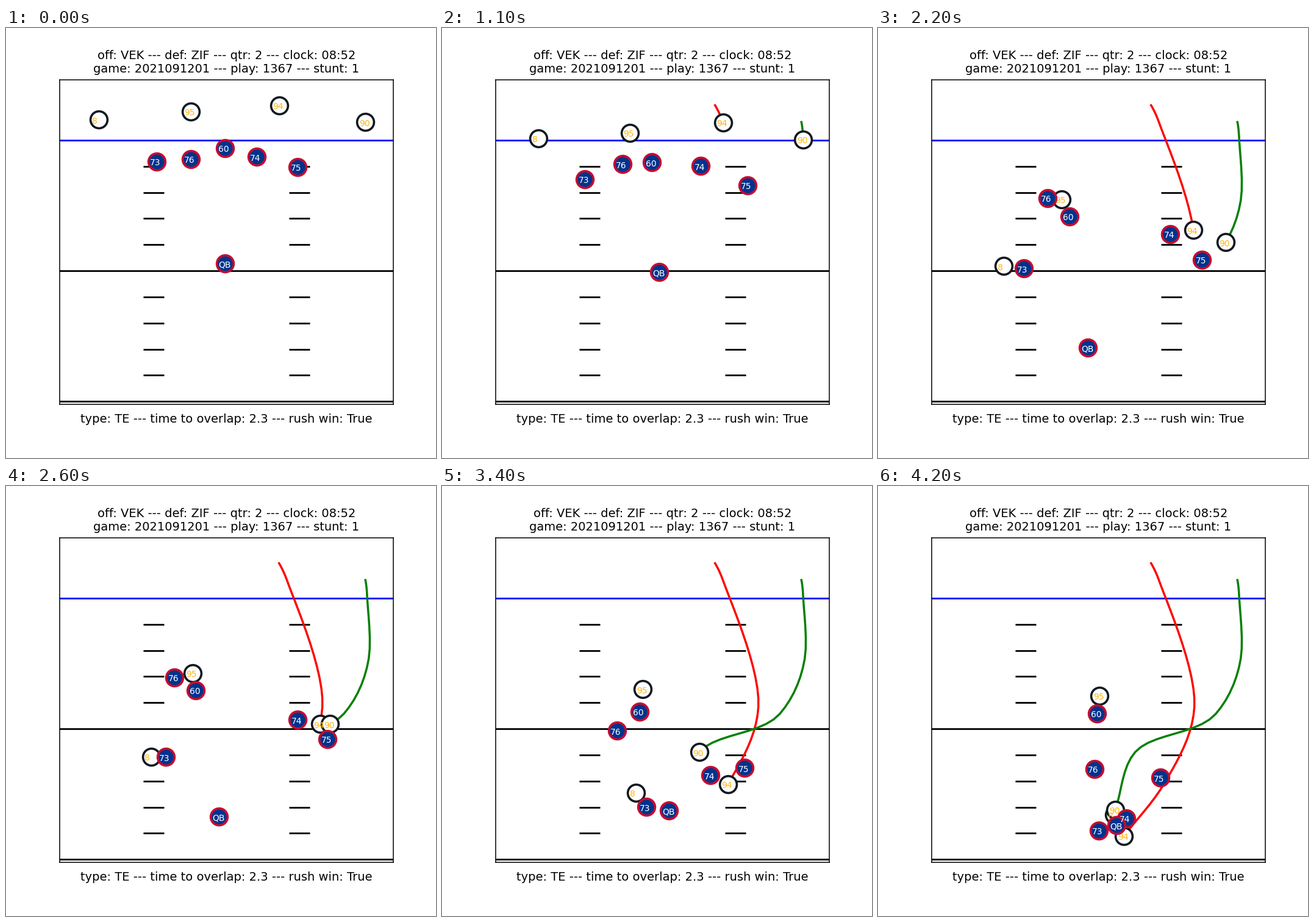
A matplotlib script for the animation above (4300 ms loop, 705 px wide and 705 px high).

```python
import numpy as np
import matplotlib.pyplot as plt
from matplotlib.animation import FuncAnimation

SIZE, DPI = 705, 100
FRAMES, STEP_MS = 43, 100
SNAP = 5  # players hold still until the snap
KEYS = (SNAP, 11, 24, 34, 42)

NAVY, RED, INK, GOLD = "#00338D", "#C60C30", "#101820", "#FFB612"
NUDGE = 0.3  # sub-pixel offset of the player markers
LABEL_SHIFT = np.array([-10.5, 6.6])


def route(*points, keys=KEYS):
    """Smooth run through the points, at rest until the first key."""
    t, p = np.array(keys, float), np.array(points) - NUDGE
    h = np.diff(t)[:, None]
    slope = np.diff(p, axis=0) / h
    m = np.zeros_like(p)
    m[1:-1] = (slope[:-1] * h[1:] + slope[1:] * h[:-1]) / (h[:-1] + h[1:])
    m[-1] = slope[-1]
    now = np.clip(np.arange(FRAMES), t[0], t[-1])
    k = np.clip(np.searchsorted(t, now, side="right") - 1, 0, len(h) - 1)
    u = ((now - t[k]) / h[k, 0])[:, None]
    return (p[k] + (p[k + 1] - p[k]) * u * u * (3 - 2 * u)
            + h[k] * u * (1 - u) * (m[k] * (1 - u) - m[k + 1] * u))


# Key points in stage pixels, y pointing down.
defense = {
    "8": route((152.3, 150.5), (158.7, 181), (221, 421.5), (318.5, 503),
               (387.5, 539.5)),
    "95": route((303, 137), (308, 172), (302.5, 296), (329.5, 333.5),
                (363.5, 344)),
    "94": route((448, 127), (461, 155), (519, 363), (469, 489), (403.5, 574)),
    "90": route((589.5, 154.5), (592.5, 183), (595, 283.5), (554, 374),
                (422, 436.5), (389.5, 531), keys=(SNAP, 11, 17, 24, 34, 42)),
}
offense = {
    "73": route((247, 219), (234.5, 248), (248, 420.5), (335, 526.5),
                (362, 565)),
    "76": route((303, 215), (296, 223.5), (277, 295), (287, 401.5),
                (355, 464)),
    "60": route((359, 197), (344.5, 220.5), (312, 323), (324, 370),
                (359.5, 373)),
    "74": route((411, 211.5), (424.5, 226.5), (482, 361), (440.5, 474.5),
                (407, 545)),
    "75": route((478, 228), (501, 258), (531, 399), (496.5, 462.5),
                (463, 478.5)),
    "QB": route((359, 386.5), (356.5, 400), (345.5, 538), (372, 532.5),
                (391.5, 556)),
}

fig = plt.figure(figsize=(SIZE / DPI, SIZE / DPI), dpi=DPI, facecolor="white")
ax = fig.add_axes([0.125, 0.125, 0.775, 0.755])
ax.set_xlim(0.125 * SIZE, 0.9 * SIZE)
ax.set_ylim(0.875 * SIZE, 0.12 * SIZE)
ax.set_xticks([])
ax.set_yticks([])
for spine in ax.spines.values():
    spine.set_linewidth(1.1)


def draw_field():
    for yard in range(11):
        y = 184 + 42.82 * yard
        if yard % 5 == 0:
            ax.axhline(y, color="black" if yard else "blue", lw=2, zorder=1)
        else:
            for x in (225.2, 464.2):
                ax.plot([x, x + 34], [y, y], color="black", lw=2,
                        solid_capstyle="butt", zorder=1)


def draw_captions():
    middle = 361.3 / SIZE
    style = dict(fontsize=14.05, ha="center")
    fig.text(middle, 1 - 77 / SIZE,
             "off: VEK --- def: ZIF --- qtr: 2 --- clock: 08:52\n"
             "game: 2021091201 --- play: 1367 --- stunt: 1",
             va="bottom", **style)
    fig.text(middle, 1 - 632.3 / SIZE,
             "type: TE --- time to overlap: 2.3 --- rush win: True",
             va="top", **style)


class Team:
    def __init__(self, routes, fill, edge, ink, zorder):
        self.paths = np.array(list(routes.values()))
        self.dots = ax.scatter(*self.paths[:, 0].T, s=400, c=fill,
                               edgecolors=edge, linewidths=2.6, zorder=zorder)
        self.labels = [ax.text(0, 0, name, color=ink, fontsize=10,
                               zorder=zorder + 1) for name in routes]

    def move(self, i):
        spots = self.paths[:, i]
        self.dots.set_offsets(spots)
        for label, spot in zip(self.labels, spots):
            label.set_position(spot + LABEL_SHIFT)


draw_field()
draw_captions()
teams = [Team(defense, "white", INK, GOLD, 4),
         Team(offense, NAVY, RED, "white", 6)]
trails = [(ax.plot([], [], color=color, lw=2.5, zorder=2)[0], defense[name])
          for name, color in (("94", "red"), ("90", "green"))]


def update(i):
    for team in teams:
        team.move(i)
    for line, path in trails:
        line.set_data(*path[:i + 1].T)
    return []


anim = FuncAnimation(fig, update, frames=FRAMES, interval=STEP_MS,
                     init_func=lambda: update(0), repeat=True, repeat_delay=0)
plt.show()
```
